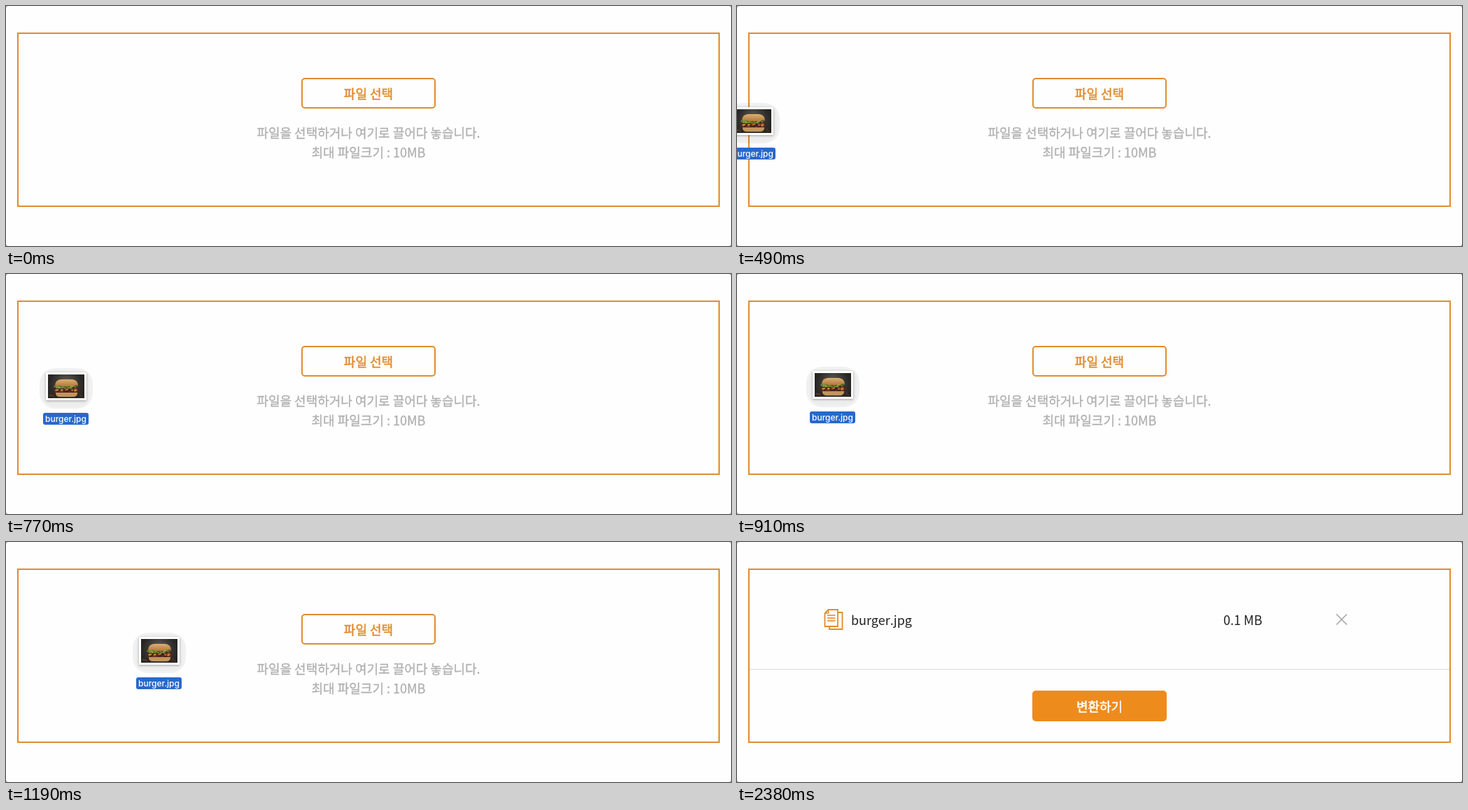
Animation, 1036 px wide and 344 px high, one loop 5.18 s. Source, as an HTML page with a canvas:

```html
<!DOCTYPE html>
<html lang="ko">
<head>
<meta charset="utf-8">
<title>파일 선택</title>
<style>
  html, body { margin: 0; width: 100%; height: 100%; overflow: hidden; background: #fefefe; }
  canvas { display: block; width: 1036px; height: 344px; }
</style>
</head>
<body>
<canvas id="stage" width="1036" height="344"></canvas>
<script>
const ctx = document.getElementById('stage').getContext('2d');
const W = 1036, H = 344, CENTER = W / 2;
const LOOP = 5180, STEP = 70;
const ENTER = 210, SPEED_UP = 630, SETTLE = 1190, NUDGE = 2240, DROP = 2310, RESULT = 2380;
const ORANGE = '#df8d2f', GRAY = '#b0b0b0', INK = '#202020';
const KOREAN = '"Noto Sans CJK KR", "Noto Sans CJK", sans-serif';

const lerp = (a, b, k) => a + (b - a) * k;
const progress = (t, from, to) => Math.min(1, Math.max(0, (t - from) / (to - from)));

// Steady entry, then a gently eased glide to the resting place.
function dragPosition(t) {
  const entry = progress(t, ENTER, SPEED_UP);
  const glide = progress(t, SPEED_UP, SETTLE);
  const eased = lerp(glide, glide * glide * (3 - 2 * glide), 0.5) + 0.02 * Math.sin(Math.PI * glide);
  const nudge = t >= NUDGE ? 1 : 0;
  return {
    x: Math.round(lerp(-29, 49, entry) + 170 * eased) - nudge,
    y: 162 + Math.round(lerp(8, 0, entry) - 6 * glide) - nudge
  };
}

function seededRandom(seed) {
  return () => (seed = (seed * 16807) % 2147483647) / 2147483647;
}

// `bold` is a hairline outline that thickens the glyphs without widening them.
function text(str, x, y, color, { bold = 0, weight = 400, size = 18, family = KOREAN, align = 'center' } = {}) {
  ctx.font = `${weight} ${size}px ${family}`;
  ctx.textAlign = align;
  ctx.fillStyle = ctx.strokeStyle = color;
  ctx.fillText(str, x, y);
  if (!bold) return;
  ctx.lineWidth = bold;
  ctx.lineJoin = 'round';
  ctx.strokeText(str, x, y);
  ctx.lineJoin = 'miter';
}

function fillRound(color, ...box) {
  ctx.fillStyle = color;
  ctx.beginPath();
  ctx.roundRect(...box);
  ctx.fill();
}

function strokeRound(color, width, ...box) {
  ctx.strokeStyle = color;
  ctx.lineWidth = width;
  ctx.beginPath();
  ctx.roundRect(...box);
  ctx.stroke();
}

function line(color, width, x1, y1, x2, y2) {
  ctx.strokeStyle = color;
  ctx.lineWidth = width;
  ctx.beginPath();
  ctx.moveTo(x1, y1);
  ctx.lineTo(x2, y2);
  ctx.stroke();
}

function strokePath(color, width, d) {
  ctx.strokeStyle = color;
  ctx.lineWidth = width;
  ctx.stroke(new Path2D(d));
}

function drawWindow() {
  ctx.fillStyle = '#8c8c8c';
  ctx.fillRect(0, 0, W, H);
  fillRound('#fefefe', 0, 0, W, H, 3);
  strokeRound(ORANGE, 2, 17, 39, W - 34, 248, 0);
}

function drawDropZone() {
  strokeRound(ORANGE, 2, 423, 104, 190, 42, 4);
  text('파일 선택', CENTER, 133, ORANGE, { weight: 500, bold: 0.5 });
  text('파일을 선택하거나 여기로 끌어다 놓습니다.', CENTER, 189, GRAY, { bold: 0.3 });
  text('최대 파일크기 : 10MB', CENTER, 217, GRAY, { bold: 0.3 });
}

function scatter(random, colors, count, halfWidth, top, bottom, size) {
  for (let i = 0; i < count; i++) {
    ctx.fillStyle = colors[i % colors.length];
    ctx.beginPath();
    ctx.ellipse(lerp(-halfWidth, halfWidth, random()), lerp(top, bottom, random()),
      size * (0.7 + random()), size * 0.7, 0, 0, 2 * Math.PI);
    ctx.fill();
  }
}

function drawBurger() {
  const random = seededRandom(41);
  const smoke = ctx.createRadialGradient(0, -8, 2, 0, 0, 26);
  smoke.addColorStop(0, '#55514b');
  smoke.addColorStop(1, '#262524');
  ctx.fillStyle = smoke;
  ctx.fillRect(-26, -17, 52, 34);
  scatter(random, ['#49301f', '#2c211b', '#6a4424'], 24, 23, 11, 15, 1.4);
  fillRound('#c3945c', -15, 8, 31, 7, [1, 1, 5, 5]);
  fillRound('#4c241b', -17, 1, 35, 8, 3);

  const crust = ctx.createLinearGradient(0, -11, 0, 0);
  crust.addColorStop(0, '#dfb479');
  crust.addColorStop(1, '#b5793a');
  fillRound(crust, -16, -10, 33, 10, [13, 13, 2, 2]);

  scatter(random, ['#6f8c36', '#94a94a', '#4b6426'], 30, 16, -1, 3, 1.6);
  scatter(random, ['#8f3526', '#d3a33f', '#3f1f18', '#a85a35'], 24, 15, 4, 8, 1.4);
}

function drawDraggedFile(t) {
  const { x, y } = dragPosition(t);
  ctx.save();
  ctx.translate(x, y);
  fillRound('rgba(0,0,0,.05)', -38, -26, 76, 58, 22);
  fillRound('rgba(0,0,0,.015)', -34, -23, 68, 52, 18);
  ctx.save();
  ctx.shadowColor = 'rgba(0,0,0,.32)';
  ctx.shadowBlur = 3;
  ctx.shadowOffsetY = 1;
  ctx.fillStyle = '#fff';
  ctx.fillRect(-29, -20, 58, 40);
  ctx.restore();
  drawBurger();
  fillRound('#2769cb', -33, 38, 65, 17, 3);
  text('burger.jpg', -0.5, 51, '#fff', { weight: 500, size: 12, family: 'Inter, sans-serif' });
  ctx.restore();
}

function drawFileIcon() {
  strokePath(ORANGE, 1.8, 'M144.5 101h6v24H132v-4');
  strokePath(ORANGE, 1.8, 'M130.5 97H144v24H125.5V102z');
  strokePath(ORANGE, 1.6, 'M130.5 97v5h-5');
  for (let y = 105; y <= 113; y += 4) line(ORANGE, 1.6, 129, y, 140.5, y);
}

function drawResult() {
  drawFileIcon();
  text('burger.jpg', 163, 119, INK, { align: 'left' });
  text('0.1 MB', 695, 119, INK, { align: 'left' });
  for (const side of [-1, 1]) line('#a6a6a6', 1.6, 864 - 7.5 * side, 103.5, 864 + 7.5 * side, 118.5);
  line('#dcdcdc', 1, 18, 182.5, 1018, 182.5);
  fillRound('#ee8b1d', 422, 213, 192, 44, 5);
  text('변환하기', CENTER, 243, '#fff', { weight: 500, bold: 0.5 });
}

function render(elapsed) {
  const t = Math.floor((elapsed % LOOP) / STEP) * STEP;
  drawWindow();
  if (t >= RESULT) {
    drawResult();
  } else {
    drawDropZone();
    if (t >= ENTER && t < DROP) drawDraggedFile(t);
  }
}

const start = performance.now();
function tick() {
  render(performance.now() - start);
  requestAnimationFrame(tick);
}
tick();
</script>
</body>
</html>
```
